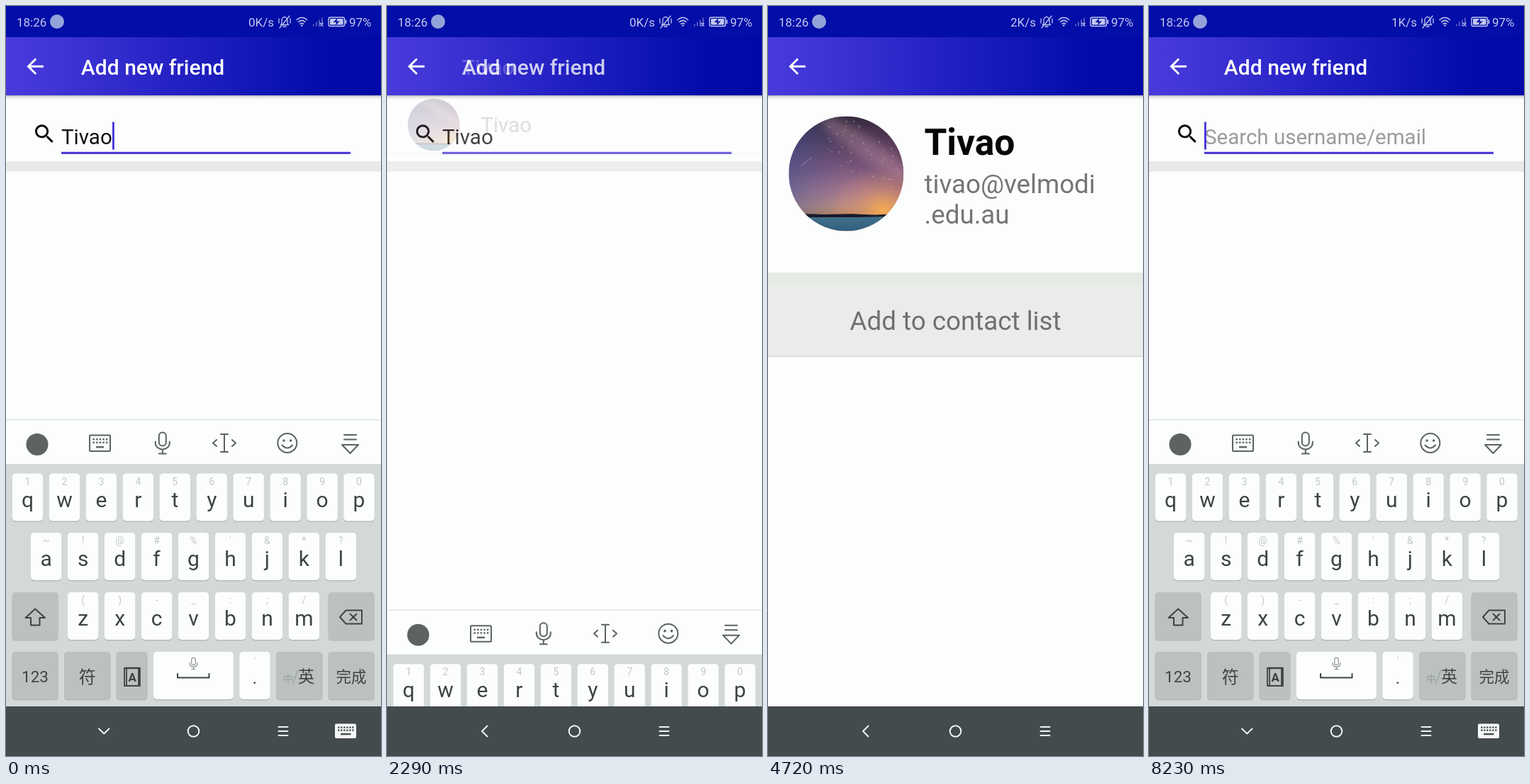
An HTML page that plays this animation: 529 px wide and 1058 px high, repeating every 8630 ms.

```html
<!DOCTYPE html>
<html lang="en">
<head>
<meta charset="utf-8">
<title>Add new friend</title>
<style>
  html, body { margin: 0; width: 100%; height: 100%; overflow: hidden; background: #fcfdfd; }
  svg { display: block; width: 100vw; height: 100vh; }
  text { font-family: Roboto, "Noto Sans CJK SC", "Noto Sans CJK JP", sans-serif; }
  .line { fill: none; stroke-linecap: round; stroke-linejoin: round; }
</style>
</head>
<body>
<svg id="stage" viewBox="0 0 529 1058" preserveAspectRatio="none"></svg>
<script>
const LOOP = 8630;
const NAME = "Tivao";
const stage = document.getElementById("stage");

const rect = (x, y, w, h, fill, extra = "") =>
  `<rect x="${x}" y="${y}" width="${w}" height="${h}" fill="${fill}" ${extra}/>`;
const text = (x, y, size, fill, content, extra = "") =>
  `<text x="${x}" y="${y}" font-size="${size}" fill="${fill}" ${extra}>${content}</text>`;
const centered = (x, y, size, fill, content, extra = "") =>
  text(x, y, size, fill, content, `text-anchor="middle" ${extra}`);
const line = (d, stroke, width, extra = "") =>
  `<path class="line" d="${d}" stroke="${stroke}" stroke-width="${width}" ${extra}/>`;
const circle = (x, y, r, fill, extra = "") =>
  `<circle cx="${x}" cy="${y}" r="${r}" fill="${fill}" ${extra}/>`;
const group = (id, content, extra = "") => `<g id="${id}" ${extra}>${content}</g>`;
const stops = list => list.map(([at, color, alpha = 1]) =>
  `<stop offset="${at}" stop-color="${color}" stop-opacity="${alpha}"/>`).join("");

function seeded(seed) {
  return () => (seed = (seed * 16807) % 2147483647) / 2147483647;
}

function nightSky() {
  const random = seeded(41);
  let stars = "";
  for (let i = 0; i < 70; i++) {
    const along = random(), spread = (random() + random() - 1) * 22;
    stars += circle((35 + along * 62 + spread * 0.5).toFixed(1), (8 + along * 42 - spread).toFixed(1),
      (0.25 + random() * 0.4).toFixed(2), "#f3d9dc", 'opacity=".45"');
  }
  return `<symbol id="sky" viewBox="0 0 100 100"><g clip-path="url(#round)">
    ${rect(0, 0, 100, 100, "url(#dusk)")}
    ${rect(0, 0, 100, 100, "url(#cool)")}
    ${rect(0, 0, 100, 86, "url(#glow)")}
    <ellipse cx="68" cy="28" rx="48" ry="9" fill="#d7a6b4" opacity=".32" transform="rotate(34 68 28)" filter="url(#soft)"/>
    ${stars}
    ${line("M11 43L20 36", "#c9a5c4", 0.6, 'opacity=".6"')}
    ${rect(0, 86, 100, 14, "url(#water)")}
    <path d="M0 84.5L30 85.5L55 85L75 86L100 84.5V87L60 88L0 88Z" fill="#19192a"/>
  </g></symbol>`;
}

const defs = `<defs>
  <linearGradient id="bar">${stops([[0, "#483bdb"], [0.2, "#3a31d2"], [0.45, "#2421c3"], [0.7, "#0f15b3"], [0.85, "#030ba8"], [1, "#0209a6"]])}</linearGradient>
  <linearGradient id="shade" x2="0" y2="1">${stops([[0, "#000", 0.3], [0.4, "#000", 0.1], [1, "#000", 0]])}</linearGradient>
  <linearGradient id="dusk" x2="0" y2="1">${stops([[0, "#30242f"], [0.22, "#533a55"], [0.45, "#805778"], [0.65, "#ad7b8b"], [0.78, "#c69380"], [0.86, "#c98f58"]])}</linearGradient>
  <linearGradient id="cool">${stops([[0, "#344f96", 0.5], [0.5, "#50559a", 0.12], [1, "#60324c", 0.25]])}</linearGradient>
  <radialGradient id="glow" cx=".82" cy=".95" r=".45">${stops([[0, "#ffb04d", 0.9], [0.5, "#e79b6a", 0.4], [1, "#d99080", 0]])}</radialGradient>
  <linearGradient id="water" x2="0" y2="1">${stops([[0, "#42718b"], [1, "#315f80"]])}</linearGradient>
  <filter id="soft" x="-.3" y="-1" width="1.6" height="3"><feGaussianBlur stdDeviation="4"/></filter>
  <clipPath id="round"><circle cx="50" cy="50" r="50"/></clipPath>
  ${nightSky()}
</defs>`;

const avatar = (x, y, size) => `<use href="#sky" x="${x}" y="${y}" width="${size}" height="${size}"/>`;

const page = title =>
  rect(0, 43, 529, 945, "#fcfdfd") +
  rect(0, 126, 529, 6, "url(#shade)") +
  rect(0, 43, 529, 83, "url(#bar)") +
  `<path transform="translate(23.5 67.6) scale(1.47)" fill="#fff" d="M20 11H7.83l5.59-5.59L12 4l-8 8 8 8 1.41-1.41L7.83 13H20v-2z"/>` +
  text(105.8, 96.5, 30, "#fff", title, 'font-weight="500"');

const searchPage = page("Add new friend") +
  `<path transform="translate(36.6 162.8) scale(1.47)" fill="#080808" d="M15.5 14h-.79l-.28-.27C15.41 12.59 16 11.11 16 9.5 16 5.91 13.09 3 9.5 3S3 5.91 3 9.5 5.91 16 9.5 16c1.61 0 3.09-.59 4.23-1.57l.27.28v.79l5 4.99L20.49 19l-4.99-5zm-6 0C7.01 14 5 11.99 5 9.5S7.01 5 9.5 5 14 7.01 14 9.5 11.99 14 9.5 14z"/>` +
  `<text id="query" x="78" y="194.5" font-size="29.5"></text>` +
  rect(78, 205.8, 408, 3, "#4434d6") +
  rect(150, 163.5, 2.8, 39, "#4434d6", 'id="cursor"') +
  rect(0, 219, 529, 14.5, "#e8eae8");

const listPage = page(NAME) +
  avatar(29.3, 130.7, 73.5) +
  text(132.3, 178, 29.5, "#737373", NAME) +
  rect(0, 207.3, 529, 1.4, "#d7dad9");

const profilePage = page("") +
  avatar(29.3, 155.5, 162) +
  text(220.5, 210, 51.5, "#050505", NAME, 'font-weight="700"') +
  text(220.5, 264, 36.75, "#757575", "tivao@velmodi") +
  text(220.5, 307, 36.75, "#757575", ".edu.au") +
  rect(0, 376, 529, 15, "#e6eae5") +
  rect(0, 391, 529, 103, "#eaece9", 'id="press"') +
  rect(0, 493.5, 529, 1.6, "#d6d9d5") +
  centered(264.5, 456.5, 36.75, "#6f716f", "", 'id="action"');

const INK = "#3e4343", ICON = "#5d6262", HINT = "#c3c7c7";

const key = (x, y, w, fill, extra = "") =>
  rect(x, y + 1.6, w, 67, "#b5bbbb", 'rx="5"') + rect(x, y, w, 67, fill, `rx="5" ${extra}`);

function letterRow(x, y, letters, hints) {
  return [...letters].map((letter, i) => {
    const left = x + i * 51.95, mid = left + 21.7;
    return key(left, y, 43.4, "#fcfdfd") +
      centered(mid, y + 16, 14, HINT, hints[i].replace("&", "&amp;")) +
      centered(mid, y + 47, 30, INK, letter);
  }).join("");
}

const dots = (x, y, columns, rows, step, fill, size) =>
  Array.from({ length: columns * rows }, (_, i) =>
    rect(x + (i % columns) * step, y + Math.floor(i / columns) * step, size, size, fill)).join("");

const microphone = (x, y, scale, color) => `<g transform="translate(${x} ${y}) scale(${scale})">
  <rect class="line" x="-5" y="-15" width="10" height="19" rx="5" stroke="${color}" stroke-width="2"/>
  ${line("M-10 -2V0A10 9 0 0 0 10 0V-2M0 9V15M-5 15H5", color, 2)}</g>`;

function toolbar() {
  return rect(0, 583, 529, 63, "#fcfdfd") + rect(0, 583, 529, 1.2, "#dce0df") +
    circle(44, 618.5, 15.5, ICON) +
    rect(118, 605.5, 29, 22.5, "none", `rx="1" stroke="${ICON}" stroke-width="2"`) +
    dots(122.5, 610, 5, 2, 4.6, ICON, 2.4) + rect(127, 621, 11, 2.4, ICON) +
    microphone(220.8, 616.5, 1, ICON) +
    line("M303 604H313M308 604V629M303 629H313M297 612L292 616.5L297 621M319 612L324 616.5L319 621", ICON, 2) +
    circle(396.8, 616.5, 13.5, "none", `stroke="${ICON}" stroke-width="2"`) +
    circle(392, 613, 1.8, ICON) + circle(401.6, 613, 1.8, ICON) +
    line("M389.5 619.5Q396.8 627.5 404 619.5", ICON, 2) +
    line("M477 605H494M477 611.5H494M474 619H497L485.5 631Z", ICON, 2);
}

function keyboard() {
  const gray = "#bbc1c1";
  return toolbar() + rect(0, 646, 529, 342, "#d3d9d8") +
    letterRow(8.8, 659.5, "qwertyuiop", "1234567890") +
    letterRow(35, 743, "asdfghjkl", "~!@#%'&*?") +
    letterRow(87, 827, "zxcvbnm", "()-_:;/") +
    key(8.5, 827, 65.5, gray) +
    line("M41.2 850.5L55 863H47.5V873.5H35V863H27.5Z", INK, 2) +
    key(454.5, 827, 65.5, gray) +
    line("M471 862L479.5 852.5H502V871.5H479.5ZM485.5 857.5L494.5 866.5M494.5 857.5L485.5 866.5", INK, 1.9) +
    key(8.5, 911, 65.5, gray) + centered(41, 954, 22.5, INK, "123") +
    key(82, 911, 65.5, gray) + centered(114.7, 955, 24, INK, "符") +
    key(155.5, 911, 44, gray) +
    line("M167 934H187V959H167ZM170 934V959", INK, 1.8) +
    line("M168 934H188.5V959", INK, 2.6) + centered(178.3, 953, 17, INK, "A", 'font-weight="700"') +
    key(208, 911, 112.8, "#fcfdfd") + microphone(264.5, 927.5, 0.55, "#858989") +
    line("M242 942V947.5H286.5V942", INK, 2) +
    key(329.3, 911, 43.4, "#fcfdfd") + centered(351, 929, 14, HINT, "'") + centered(351, 956, 24, INK, ".") +
    key(381, 911, 65.5, gray) + text(391, 954, 14, "#979d9d", "中") +
    line("M404.5 957L411.5 937", "#979d9d", 1.2) + text(412, 954, 23, INK, "英") +
    key(454.5, 911, 65.5, gray, 'id="done"') + centered(487, 954, 21.5, INK, "完成");
}

function statusBar() {
  const pale = "#c2c8f0";
  const bars = [0, 1, 2, 3].map(i =>
    rect(433 + i * 4, 25.5 - i * 3, 1.8, 3 + i * 3, pale, 'opacity=".45"')).join("");
  return rect(0, 0, 529, 44, "#030da7") +
    text(15, 28.5, 17, pale, "18:26") +
    circle(72, 22, 10, "#93a3d9") +
    text(342, 28.5, 17, pale, "0K/s", 'id="speed"') +
    line("M387.5 26.5H398.5L397 24V20A4 4.5 0 0 0 389 20V24ZM391 29H395M386 31L400 14M385 18V24M401 18V24", pale, 1.3) +
    line("M410 19.5Q417.3 13 424.6 19.5M412.5 22.5Q417.3 18.3 422 22.5M415 25.2Q417.3 23.3 419.6 25.2", pale, 1.5) +
    circle(417.3, 27.5, 1.2, pale) +
    group("traffic", line("M424 23.5V29M422.5 25L424 23.5L425.5 25M422.5 27.5L424 29L425.5 27.5", pale, 1.1)) +
    bars + line("M443 24L447 28M447 24L443 28", pale, 1.3) +
    rect(455, 16, 22.5, 12.5, "none", `rx="2.5" stroke="${pale}" stroke-width="1.4"`) +
    rect(457, 18, 18.5, 8.5, pale, 'rx="1"') + rect(478.5, 19.5, 1.8, 5.5, pale) +
    `<path d="M467.5 17L461.5 23H466L464.5 27.5L471 21.5H466.5Z" fill="#030da7"/>` +
    text(484, 28.5, 17, pale, "97%");
}

const navBar = rect(0, 988, 529, 70, "#434b4c") +
  line("", "#f2f4f4", 1.9, 'id="back"') +
  circle(264.5, 1023, 7.8, "none", 'stroke="#f2f4f4" stroke-width="2"') +
  line("M384.5 1017H397.5M384.5 1023H397.5M384.5 1029H397.5", "#f2f4f4", 1.9) +
  group("switcher", rect(464, 1012.5, 30, 20.5, "#f6f8f8", 'rx="2"') +
    dots(468.2, 1016.5, 6, 2, 4, "#434b4c", 2.3) + rect(472, 1026, 14.5, 2.3, "#434b4c"));

stage.innerHTML = defs + group("search", searchPage) + group("list", listPage) +
  group("profile", profilePage) + group("keys", keyboard()) + statusBar() + navBar;

const part = Object.fromEntries([...stage.querySelectorAll("[id]")].map(node => [node.id, node]));
const show = (id, visible) => part[id].setAttribute("visibility", visible ? "visible" : "hidden");
const set = (id, name, value) => part[id].setAttribute(name, value);
const within = (t, from, to) => t >= from && t < to;
const ease = (t, from, to) => {
  const k = Math.min(1, Math.max(0, (t - from) / (to - from)));
  return k * k * (3 - 2 * k);
};
const fade = (id, opacity) => {
  set(id, "opacity", opacity);
  set(id, "display", opacity > 0 ? "inline" : "none");
};

function draw(t) {
  const returned = t >= 6200;
  const typed = !returned;

  fade("list", returned ? 0 : ease(t, 2200, 2500));
  fade("profile", ease(t, 3860, 4130) - ease(t, 6200, 6460));

  const drop = ease(t, 2120, 2400) - ease(t, 6360, 6680);
  set("keys", "transform", `translate(0 ${405 * drop})`);
  set("keys", "display", drop < 1 ? "inline" : "none");
  set("done", "fill", within(t, 1890, 2020) ? "#a5abab" : "#bbc1c1");

  part.query.textContent = typed ? NAME : "Search username/email";
  set("query", "fill", typed ? "#111" : "#9a9c9b");
  set("cursor", "x", typed ? 150 : 78);
  show("cursor", t < 400 || within(t, 940, 1480) || within(t, 6200, 6750) ||
    within(t, 7290, 7830) || t >= 8230);

  part.action.textContent = t < 4990 ? "Add to contact list" : "Invitation Sent";
  set("press", "opacity", t < 4720 ? 0 : 1 - ease(t, 4880, 5260));

  part.speed.textContent = t < 2430 ? "0K/s" : t < 5800 ? "2K/s" : "1K/s";
  show("traffic", within(t, 3510, 4180) || within(t, 5800, 6880));

  const keysOpen = drop < 0.5;
  set("back", "d", keysOpen ? "M131 1019.5L138.3 1026.5L145.5 1019.5" : "M141.5 1015.5L134 1023L141.5 1030.5");
  show("switcher", keysOpen);
}

const start = performance.now();
function tick() {
  draw((performance.now() - start) % LOOP);
  requestAnimationFrame(tick);
}
tick();
</script>
</body>
</html>
```
